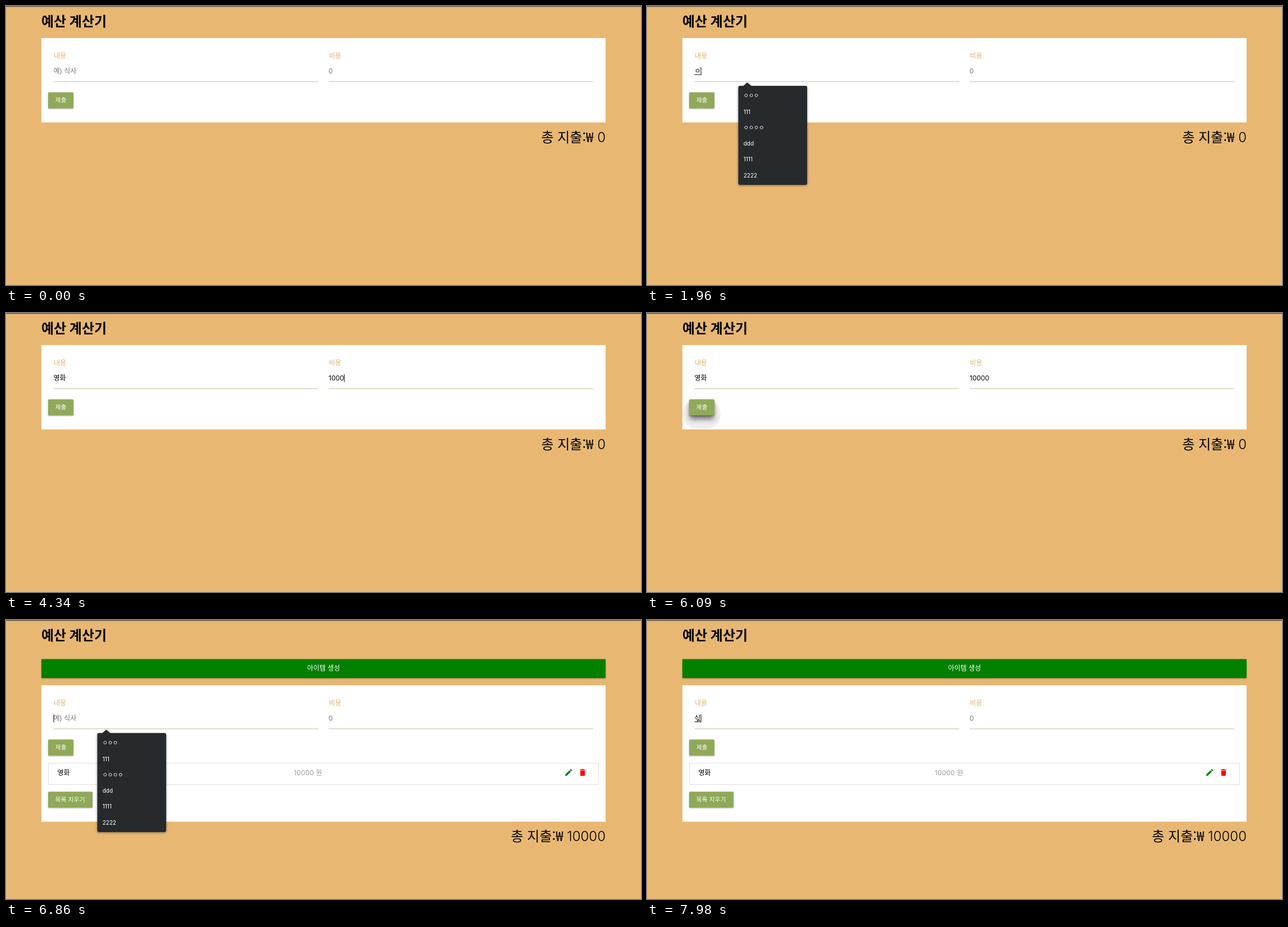
Animation of 1130 by 496 pixels, one loop 8 s. Source, as an HTML page:

```html
<!DOCTYPE html>
<html lang="ko">
<head>
<meta charset="utf-8">
<title>예산 계산기</title>
<style>
  html, body { margin: 0; width: 100%; height: 100%; overflow: hidden; background: #e8b873; }
  svg { display: block; width: 1130px; height: 496px; }
  text { font: 12px Inter, "Noto Sans CJK KR", "Noto Sans CJK JP", sans-serif; white-space: pre; }
  .title { font-size: 24px; font-weight: 700; }
  .label { fill: #e0b26c; }
  .line { stroke: #c2c3a3; }
  .btn rect { fill: #90a959; filter: drop-shadow(0 1px 1px rgba(0, 0, 0, .32)); }
  .btn text { fill: #fff; font-size: 10.5px; letter-spacing: .3px; }
  .total { font: 24px "Noto Sans CJK KR", "Noto Sans CJK JP", sans-serif; }
  .total tspan { font-family: Inter, sans-serif; font-weight: 300; }
  .alert { fill: #008000; filter: drop-shadow(0 1px 1px rgba(0, 0, 0, .3)); }
  .menu text { fill: #fff; font-size: 10px; }
  .menu path { fill: #272a2d; filter: drop-shadow(0 1px 2px rgba(0, 0, 0, .45)); }
</style>
</head>
<body>
<svg viewBox="0 0 1130 496">
  <rect width="1130" height="496" fill="#e8b873"/>
  <rect width="1" height="496" fill="#d8b98a"/>
  <rect width="1130" height="1.3" fill="#47413f"/>
  <text class="title" x="63" y="36">예산 계산기</text>

  <g id="alert">
    <rect class="alert" x="63" y="69.5" width="1004" height="33.7" rx="1"/>
    <text x="565" y="90" fill="#fff" text-anchor="middle">아이템 생성</text>
  </g>

  <g id="form">
    <rect id="card" x="63" y="57" width="1004" fill="#fff"/>
    <text class="label" x="85" y="93">내용</text>
    <text class="label" x="574.5" y="93">비용</text>
    <path class="line" d="M85 134.5H555.5M574 134.5H1045"/>
    <text id="name" x="84.5" y="120"></text>
    <text id="cost" x="574" y="120"></text>
    <rect id="mark" y="121.5" height="1" />
    <rect id="caret" y="109" width="1" height="14" />

    <g id="glow">
      <rect x="64" y="154" width="67" height="52" rx="25" fill-opacity=".065" style="filter:blur(1px)"/>
      <rect x="76" y="161" width="43" height="28" rx="3" fill-opacity=".5" style="filter:blur(4px)"/>
    </g>
    <g class="btn">
      <rect x="75" y="153.5" width="45" height="28.5" rx="1.5"/>
      <text x="87.7" y="171.3">제출</text>
    </g>

    <g id="list">
      <rect x="75.5" y="195.5" width="979" height="38" fill="#fff" stroke="#dedede"/>
      <text x="91.5" y="216.5">영화</text>
      <text x="512" y="217" fill="#999" letter-spacing=".15">10000 원</text>
      <path transform="translate(993.3 204) scale(.667)" fill="#008000"
        d="M3 17.25V21h3.75L17.81 9.94l-3.75-3.75zM20.71 7.04a1 1 0 0 0 0-1.41l-2.34-2.34a1 1 0 0 0-1.41 0l-1.83 1.83 3.75 3.75z"/>
      <path transform="translate(1018 204) scale(.667)" fill="#f00"
        d="M6 19c0 1.1.9 2 2 2h8c1.1 0 2-.9 2-2V7H6zM19 4h-3.5l-1-1h-5l-1 1H5v2h14z"/>
      <g class="btn">
        <rect x="75" y="246.3" width="79" height="28.2" rx="1.5"/>
        <text x="87.7" y="264">목록 지우기</text>
      </g>
    </g>

    <g id="menu" class="menu">
      <path d="M165.5 142H171.5L178.5 136L185.5 142H282Q285 142 285 145V315Q285 318 282 318H165.5Q162.5 318 162.5 315V145Q162.5 142 165.5 142Z"/>
    </g>
  </g>

  <text class="total" id="total" x="1067" text-anchor="end">총 지출:₩ <tspan id="sum"></tspan></text>
</svg>

<script>
const LOOP = 8000;
const $ = id => document.getElementById(id);
const el = Object.fromEntries(
  ["alert", "form", "card", "name", "cost", "mark", "caret", "glow", "list", "menu", "total", "sum"].map(id => [id, $(id)]));

["ㅇㅇㅇ", "111", "ㅇㅇㅇㅇ", "ddd", "1111", "2222"].forEach((item, i) => {
  const text = document.createElementNS("http://www.w3.org/2000/svg", "text");
  text.textContent = item;
  text.setAttribute("x", 171.7);
  text.setAttribute("y", 163.4 + i * 28.25);
  el.menu.append(text);
});

// mark: index of the syllable being composed, -1 when none
const start = { name: "", cost: "", caret: "", mark: -1, menu: false, done: false };
const steps = [
  [700, { caret: "name", menu: true }],
  [1260, { caret: "" }],
  [1820, { caret: "name" }],
  [1960, { name: "ㅇ", mark: 0 }],
  [2030, { menu: false }],
  [2100, { name: "여" }],
  [2170, { name: "영" }],
  [2450, { name: "영호", mark: 1 }],
  [2520, { name: "영화" }],
  [3080, { caret: "cost" }],
  [3430, { caret: "", mark: -1 }],
  [3500, { caret: "cost" }],
  [3640, { cost: "1" }],
  [4060, { cost: "10" }],
  [4200, { cost: "100" }],
  [4340, { cost: "1000" }],
  [4410, { cost: "10000" }],
  [5040, { caret: "" }],
  [5530, { caret: "cost" }],
  [5950, { caret: "" }],
  [6160, { name: "", cost: "", done: true }],
  [6860, { caret: "name", menu: true }],
  [7350, { caret: "" }],
  [7490, { caret: "name", name: "ㅅ", mark: 0 }],
  [7560, { menu: false }],
  [7630, { name: "시" }],
  [7700, { name: "식" }],
  [7980, { name: "싟" }],
];

const ramp = (t, a, b) => Math.min(1, Math.max(0, (t - a) / (b - a)));
const show = (node, on) => node.setAttribute("display", on ? "inline" : "none");

function setField(node, value, hint) {
  const text = value || hint;
  if (node.textContent !== text) node.textContent = text;
  node.setAttribute("fill", value ? "#000" : "#757575");
}

function draw(t) {
  const s = Object.assign({}, start, ...steps.filter(([at]) => at <= t).map(([, change]) => change));

  setField(el.name, s.name, "예) 식사");
  setField(el.cost, s.cost, "0");
  show(el.alert, s.done);
  show(el.list, s.done);
  show(el.menu, s.menu);
  el.form.setAttribute("transform", `translate(0 ${s.done ? 59 : 0})`);
  el.card.setAttribute("height", s.done ? 242.5 : 150);
  el.total.setAttribute("y", s.done ? 393 : 241.5);
  el.sum.textContent = s.done ? "10000" : "0";

  show(el.caret, s.caret);
  if (s.caret) {
    const field = el[s.caret];
    const width = s[s.caret] ? field.getComputedTextLength() : 0;
    el.caret.setAttribute("x", Number(field.getAttribute("x")) + width);
  }

  show(el.mark, s.mark >= 0);
  if (s.mark >= 0) {
    const before = s.mark ? el.name.getSubStringLength(0, s.mark) : 0;
    el.mark.setAttribute("x", 84.5 + before);
    el.mark.setAttribute("width", el.name.getComputedTextLength() - before);
  }

  const glow = ramp(t, 5900, 6080) * (1 - ramp(t, 6190, 6440));
  el.glow.setAttribute("opacity", glow);
}

const origin = performance.now();
function tick() {
  draw((performance.now() - origin) % LOOP);
  requestAnimationFrame(tick);
}
tick();
</script>
</body>
</html>
```
